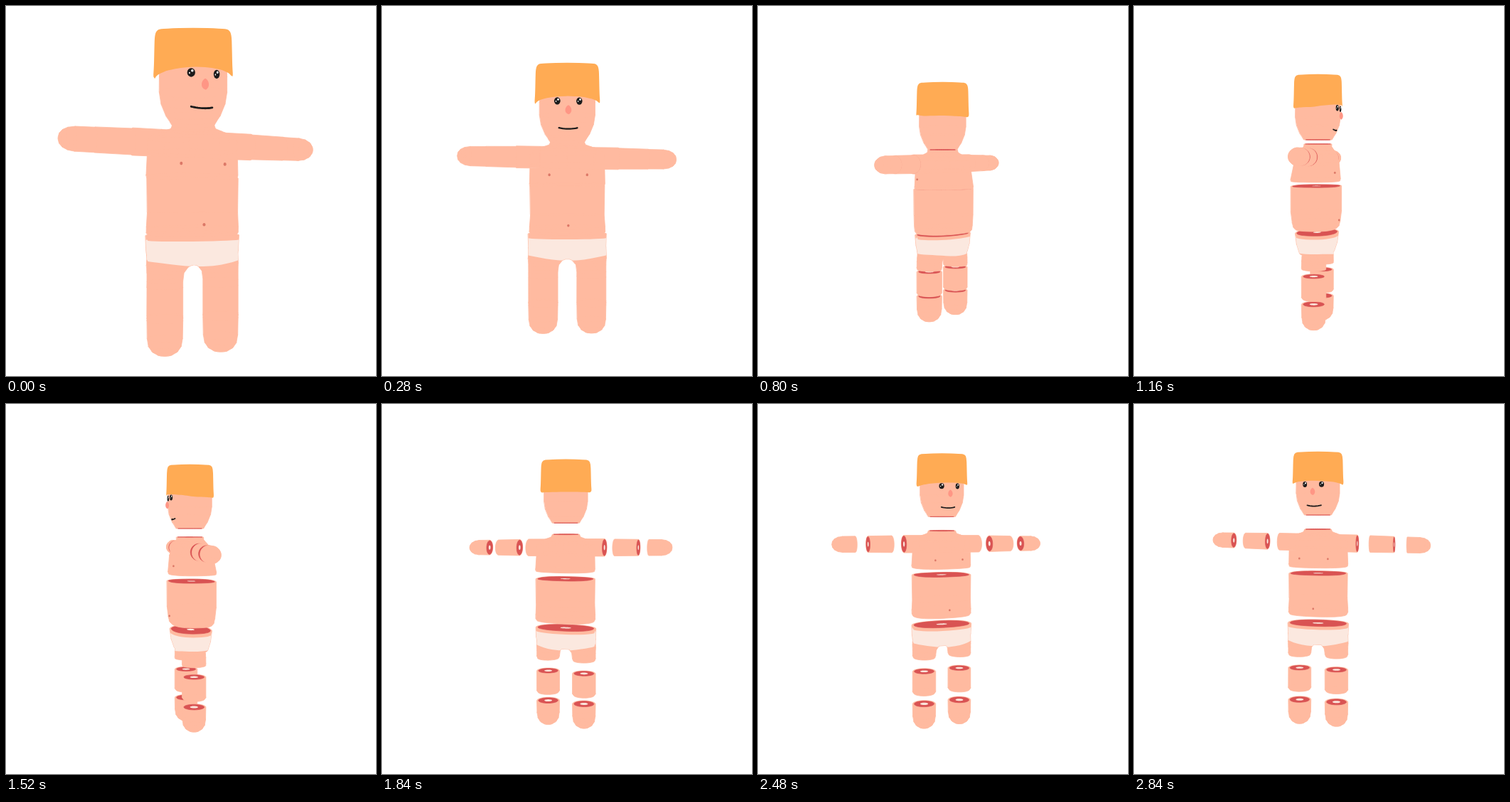
An HTML page with a canvas that plays this animation: 520 px wide and 520 px high, repeating every 2880 ms.

```html
<!DOCTYPE html>
<html lang="en">
<head>
<meta charset="utf-8">
<title>Sliced figure</title>
<style>
  html, body { margin: 0; width: 100%; height: 100%; overflow: hidden; background: #fff; }
  canvas { display: block; width: 520px; height: 520px; }
</style>
</head>
<body>
<canvas id="stage" width="520" height="520"></canvas>
<script>
const ctx = document.getElementById('stage').getContext('2d');
const LOOP = 2880, STEP = 40, DEPTH = 920, CUT_START = 680;
const SKIN = '#ffbaa0', HAIR = '#ffab54', CLOTH = '#fbe8df', FLESH = '#d95353',
      BONE = '#fbe6dc', NOSE = '#ff9685', SPOT = '#dc7867', INK = '#1c1b1b';

// time, yaw, scale, centre x, horizon, then top and bottom of head, chest, belly, hips, knees, feet
const KEYS = [
  [0,      19, 1.56, 263,   280,  31, 168, 168, 242, 242, 322, 322, 394, 394,   440,   440,   489],
  [280,     2, 1.28, 260.5, 260,  80, 191, 191, 253, 253, 320, 320, 381, 381,   420,   420,   460],
  [800,  -130, 1.07, 259.5, 225, 107, 202, 202, 257, 257, 318, 320, 370, 370,   403.5, 403.5, 438.5],
  [1160, -282, 1.04, 258.5, 205,  96, 188, 194, 246, 253, 312, 318, 368, 375,   408,   413,   448],
  [1520, -438, 1.01, 258.5, 180,  85, 175, 187, 239, 249, 309, 317, 365, 378,   410,   419,   452.5],
  [2200, -660, 1,    258.5, 145,  72, 161, 180, 231, 242, 299, 311, 358, 374.5, 407,   419,   452.5],
  [2840, -733, 1,    258.5, 150,  67, 156, 176, 228, 238, 295, 308, 356, 372,   404,   417,   450.5]
];

// Monotone cubic curve through one column of the keys
function track(col) {
  const t = KEYS.map(k => k[0]), v = KEYS.map(k => k[col]), last = t.length - 1;
  const slope = i => (v[i + 1] - v[i]) / (t[i + 1] - t[i]);
  const d = t.map((_, i) => {
    if (!i || i === last) return 0;
    const a = slope(i - 1), b = slope(i);
    return a * b > 0 ? 2 * a * b / (a + b) : 0;
  });
  d[0] = 1.5 * slope(0) - d[1] / 2;
  d[last] = 1.5 * slope(last - 1) - d[last - 1] / 2;
  return time => {
    let i = 0;
    while (i < last - 1 && time >= t[i + 1]) i++;
    const h = t[i + 1] - t[i], u = (time - t[i]) / h, w = 1 - u;
    return v[i] * w * w * (1 + 2 * u) + v[i + 1] * u * u * (3 - 2 * u) +
           h * u * w * (d[i] * w - d[i + 1] * u);
  };
}
const tracks = KEYS[0].slice(1).map((_, i) => track(i + 1));

let sinYaw, cosYaw, yaw, scale, centre, horizon, dist, open, spread;

const viewZ = (x, z) => z * cosYaw - x * sinYaw;

function project(x, y, z) {
  const s = dist / (dist - viewZ(x, z));
  return [centre + (x * cosYaw + z * sinYaw) * scale * s, horizon + (y - horizon) * s];
}

const round = n => Array.from({ length: n }, (_, i) => i / n * Math.PI * 2);
const ANGLES = round(36);
const bend = (v, p) => Math.sign(v) * Math.abs(v) ** p;

// Horizontal slice outline
const ring = (y, a, b, ox = 0, oz = 0, p = 1) => ANGLES.map(q =>
  project(ox + a * bend(Math.cos(q), p), y, oz + b * bend(Math.sin(q), p)));

// Slice outline across an arm
const armRing = (x, y, r) => ANGLES.map(q =>
  project(x, y + (0.015 * x + r * Math.sin(q)) * scale, r * Math.cos(q)));

function hull(points) {
  const sorted = [...points].sort((m, n) => m[0] - n[0] || m[1] - n[1]);
  const half = list => {
    const out = [];
    for (const p of list) {
      while (out.length > 1) {
        const a = out[out.length - 2], b = out[out.length - 1];
        if ((b[0] - a[0]) * (p[1] - a[1]) - (b[1] - a[1]) * (p[0] - a[0]) > 0) break;
        out.pop();
      }
      out.push(p);
    }
    return out.slice(0, -1);
  };
  return [...half(sorted), ...half(sorted.reverse())];
}

function addPoly(path, points) {
  points.forEach((p, i) => i ? path.lineTo(...p) : path.moveTo(...p));
  path.closePath();
}

// Fills the skin spanned by chains of slices
function solid(...chains) {
  const path = new Path2D();
  for (const rings of chains)
    for (let i = 1; i < rings.length; i++) addPoly(path, hull([...rings[i - 1], ...rings[i]]));
  ctx.fillStyle = ctx.strokeStyle = SKIN;
  ctx.lineWidth = 0.8;
  ctx.lineJoin = 'round';
  ctx.fill(path);
  ctx.stroke(path);
  return path;
}

function fillPoly(points, color, line = 0) {
  const path = new Path2D();
  addPoly(path, points);
  ctx.fillStyle = ctx.strokeStyle = color;
  ctx.fill(path);
  if (line) { ctx.lineWidth = line; ctx.stroke(path); }
}

function cap(make, inset, bone) {
  if (!open) return;
  fillPoly(make(inset), FLESH, 0.7);
  if (bone) fillPoly(make(bone), BONE);
}

function dot(x, y, rx, ry, color) {
  ctx.fillStyle = color;
  ctx.beginPath();
  ctx.ellipse(x, y, rx, ry, 0, 0, Math.PI * 2);
  ctx.fill();
}

function smooth(points, color) {
  const mid = (a, b) => [(a[0] + b[0]) / 2, (a[1] + b[1]) / 2];
  const n = points.length;
  ctx.beginPath();
  ctx.moveTo(...mid(points[n - 1], points[0]));
  points.forEach((p, i) => ctx.quadraticCurveTo(...p, ...mid(p, points[(i + 1) % n])));
  ctx.fillStyle = color;
  ctx.fill();
}

const between = (top, bottom) => f => top + (bottom - top) * f;
const LEG = 26.5;

function leg(side, kneeTop, kneeBottom, footTop, footBottom) {
  const x = side * LEG, foot = between(footTop, footBottom), knee = between(kneeTop, kneeBottom);
  solid([[0, 16], [.5, 15.7], [.72, 14.5], [.86, 11.5], [.95, 7], [.98, 3]]
    .map(([f, r]) => ring(foot(f), r, r, x)));
  cap(k => ring(footTop, 16 * k, 16 * k, x), .86, .34);
  const end = 16 - 1.4 * open;
  solid([ring(kneeTop, 16, 16, x), ring(knee(.86), 16, 16, x), ring(knee(.93), end, end, x)]);
  if (!open) solid([ring(knee(.9), 16, 16, x), ring(kneeBottom, 16, 16, x)]);
  cap(k => ring(kneeTop, 16 * k, 16 * k, x), .86, .34);
}

function hips(top, bottom) {
  const at = between(top, bottom), end = open ? .94 : 1;
  const legs = [-1, 1].map(side =>
    [[.3, 22, 20.5], [.56, 21.5, 21.5], [.61, 24, 18.7], [.72, 26, 16.5], [.88, LEG, 16], [end, LEG, 16 - open]]
      .map(([f, x, a]) => ring(at(f), a, 16, side * x)));
  const body = solid([[0, 43, 28], [.3, 42.5, 26], [.54, 41, 22]]
    .map(([f, a, b]) => ring(at(f), a, b, 0, -1, .9)), ...legs);

  const upper = [], lower = [];
  for (const q of ANGLES) {
    const x = 44 * bend(Math.cos(q), .9), z = 28 * bend(Math.sin(q), .9) - 1;
    if (viewZ(x, z) < -3) continue;
    upper.push(project(x, at(.09), z));
    lower.push(project(x, at(.48 + .08 * Math.sin(q) ** 4), z));
  }
  const byX = (m, n) => m[0] - n[0];
  upper.sort(byX);
  lower.sort(byX);
  const wide = list => [[list[0][0] - 9, list[0][1]], ...list,
    [list[list.length - 1][0] + 9, list[list.length - 1][1]]];
  ctx.save();
  ctx.clip(body);
  fillPoly([...wide(upper), ...wide(lower).reverse()], CLOTH);
  ctx.restore();
  cap(k => ring(top, 43 * k, 28 * k, 0, -1, .9), .93, .18);
}

function spot(x, y, z) {
  if (viewZ(x, z) > -6) dot(...project(x, y, z), 1.3 * scale, 1.5 * scale, SPOT);
}

function belly(top, bottom) {
  const at = between(top, bottom);
  solid([[0, 41, 33], [.6, 40.5, 33], [.85, 41.5, 31], [.95, 41.7, 29.5], [1, 40.5, 27]]
    .map(([f, a, b]) => ring(at(f), a, b, 0, -2, .82)));
  cap(k => ring(top, 41 * k, 33 * k, 0, -2, .82), .94, .17);
  spot(0, at(.8), 29);
}

function chest(top, bottom, armY) {
  const at = between(top, bottom);
  solid([[0, 18.5, 18.5], [.07, 20, 18.5], [.12, 27, 20], [.18, 36, 22], [.28, 41, 25],
         [.5, 41, 29], [.94, 41.5, 32.5], [1, 41, 32]]
    .map(([f, a, b]) => ring(at(f), a, b, 0, -3 * f, .85)),
  [-56, -30, 0, 30, 56].map(x => armRing(x, armY, 12)));
  cap(k => ring(top, 18.5 * k, 18.5 * k), .93);
  spot(-20, at(.76), 27);
  spot(20, at(.76), 27);
}

// Cut face across an arm, drawn only when it looks at the viewer
function armCap(x, y, r, normal) {
  const toward = normal * (cosYaw * -x * cosYaw - sinYaw * (dist + x * sinYaw));
  if (toward > 0) cap(k => armRing(x, y, r * k), .93, .3);
}

function armPiece(side, y, index) {
  const shape = index === 1 ? [[56, 11.5], [89, 11]]
    : [[89, 10.8], [106, 10.6], [112, 9.6], [116.5, 7.4], [119, 4.6], [120, 1.5]];
  const shift = 18 * index * spread;
  const x = v => side * (v + shift);
  solid(shape.map(([v, r]) => armRing(x(v), y, r)));
  armCap(x(shape[0][0]), y, shape[0][1], -side);
  if (index === 1) armCap(x(89), y, 11, side);
}

function eye(angle, y) {
  const facing = Math.cos(yaw + angle);
  if (facing < -.25) return;
  const [x, ey] = project(31 * Math.sin(angle), y, 31 * Math.cos(angle));
  const w = scale * Math.max(.35, facing);
  dot(x, ey, 3.6 * w, 4 * scale, INK);
  dot(x + 1 * w, ey - 1.7 * scale, 1.1 * w, 1.2 * scale, '#fff');
  dot(x - 1.5 * w, ey + .4 * scale, .6 * w, .8 * scale, '#fff');
}

function head(top, bottom) {
  const at = between(top, bottom);
  solid([[.3, 30], [.5, 30.5], [.66, 30.5], [.78, 28.8], [.9, 24.5], [.96, 21], [1, 19]]
    .map(([f, r]) => ring(at(f), r, r)));
  cap(k => ring(bottom, 19 * k, 19 * k), .88);

  if (cosYaw > -.1) {
    const [x, y] = project(0, at(.64), 32), w = Math.max(.7, cosYaw) * scale;
    ctx.fillStyle = NOSE;
    ctx.beginPath();
    ctx.moveTo(x, y - 5.2 * scale);
    ctx.bezierCurveTo(x + 3 * w, y - 4 * scale, x + 5.5 * w, y + 2 * scale, x + .5 * w, y + 5 * scale);
    ctx.bezierCurveTo(x - 5.5 * w, y + 3.5 * scale, x - 4 * w, y - 3.5 * scale, x, y - 5.2 * scale);
    ctx.fill();
  }
  const mouth = [];
  for (let i = -5; i <= 5; i++) {
    const q = i / 5 * .4;
    if (Math.cos(yaw + q) > -.15)
      mouth.push(project(25 * Math.sin(q), at(.862) - .05 * i * i * scale, 25 * Math.cos(q)));
  }
  ctx.beginPath();
  mouth.forEach(p => ctx.lineTo(...p));
  ctx.strokeStyle = INK;
  ctx.lineCap = 'round';
  ctx.lineWidth = 1.8 * scale;
  ctx.stroke();

  hair(at);
  eye(-.385, at(.527));
  eye(.385, at(.527));
}

function hair(at) {
  const left = [], right = [];
  for (const [f, k] of [[.005, .72], [.012, .92], [.07, .99], [.2, 1], [.4, 1.01], [.5, 1.03]]) {
    const xs = ring(at(f), 35 * k, 32 * k, 0, 0, .95).map(p => p[0]);
    left.push([Math.min(...xs), at(f)]);
    right.push([Math.max(...xs), at(f)]);
  }
  const rim = [];
  for (const q of ANGLES) {
    const x = 35 * Math.cos(q), z = 32 * Math.sin(q);
    if (viewZ(x, z) < 0) continue;
    const lift = 4.5 * scale * Math.max(0, Math.sin(q));
    rim.push(project(x, at(.525) - lift, z));
  }
  rim.sort((m, n) => m[0] - n[0]);
  const peak = [(left[0][0] + right[0][0]) / 2, at(-.005)];
  smooth([...left, ...rim, ...right.reverse(), peak], HAIR);
}

function draw(time) {
  const [deg, zoom, cx, hz, ...y] = tracks.map(f => f(time));
  yaw = deg * Math.PI / 180;
  sinYaw = Math.sin(yaw);
  cosYaw = Math.cos(yaw);
  scale = zoom;
  centre = cx;
  horizon = hz;
  dist = DEPTH / scale;
  open = time > CUT_START ? 1 : 0;
  spread = Math.max(0, (y[2] - y[1]) / 20);

  ctx.fillStyle = '#fff';
  ctx.fillRect(0, 0, 520, 520);

  const near = sinYaw > 0 ? -1 : 1;
  const armY = y[2] + (y[3] - y[2]) * .36;
  leg(-near, ...y.slice(8));
  leg(near, ...y.slice(8));
  hips(y[6], y[7]);
  belly(y[4], y[5]);
  armPiece(-near, armY, 2);
  armPiece(-near, armY, 1);
  chest(y[2], y[3], armY);
  armCap(-56, armY, 12, -1 * (near < 0));
  armCap(56, armY, 12, 1 * (near > 0));
  armPiece(near, armY, 1);
  armPiece(near, armY, 2);
  head(y[0], y[1]);
}

const start = performance.now();
function tick() {
  const time = (performance.now() - start) % LOOP;
  draw(Math.floor(time / STEP) * STEP);
  requestAnimationFrame(tick);
}
tick();
</script>
</body>
</html>
```
